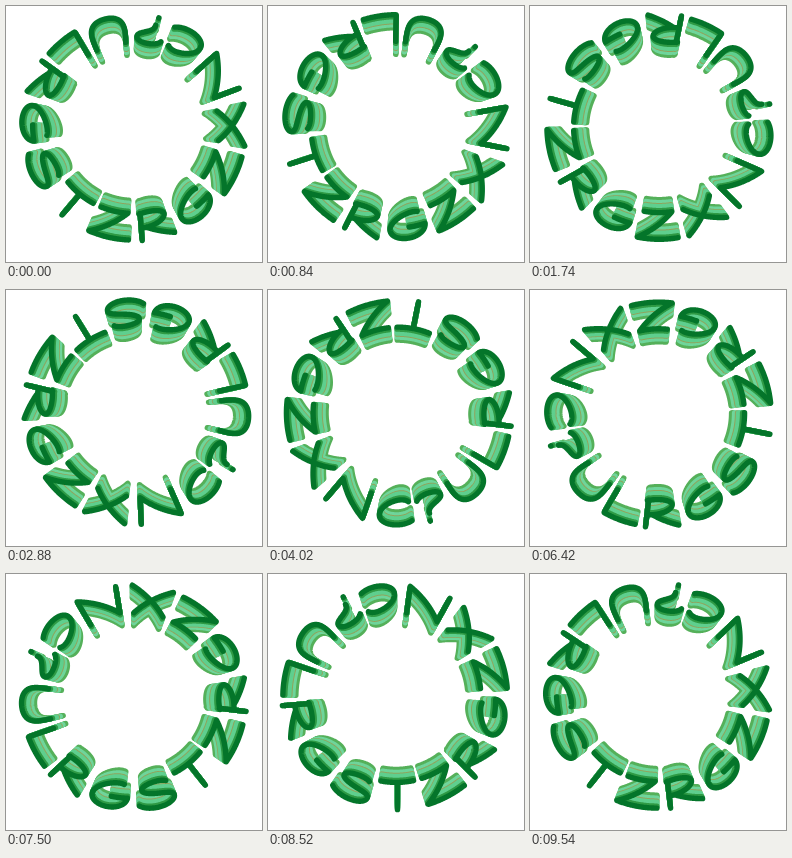
An HTML page with a canvas for the animation above (9.6 s loop, 256x256 px).

```html
<!DOCTYPE html>
<html lang="en">
<head>
<meta charset="utf-8">
<title>Rotating letter ring</title>
<style>
html, body { margin: 0; height: 100%; overflow: hidden; background: #fff; }
canvas { display: block; }
</style>
</head>
<body>
<canvas id="stage" width="256" height="256"></canvas>
<script>
const LOOP = 9600, STEP = 60, RADIUS = 114, DEPTH = 13, EM = 41;
const START = 142.5 * Math.PI / 180;
const ctx = document.getElementById('stage').getContext('2d');

// Advance width and pen strokes in hundredths of an em, y upwards from the baseline.
const glyphs = {
  T: [68, 'M6 70L63 69', 'M35 69L34 3'],
  Z: [69, 'M10 69H58L7 4H61'],
  R: [63, 'M10 2V68', 'M8 66C26 76 52 68 49 54C46 42 28 34 11 32', 'M18 33L54 4'],
  G: [68, 'M53 66C36 74 8 52 8 28C8 -4 56 -2 60 33L36 32'],
  X: [72, 'M7 3L60 70', 'M9 68L62 3'],
  N: [80, 'M12 3V68L67 6V71'],
  C: [60, 'M52 60C40 76 8 56 8 28C8 0 40 0 54 13'],
  '?': [52, 'M6 58C14 76 48 72 46 54C45 42 20 44 20 22', 'M18 4V3'],
  U: [74, 'M13 69C12 40 10 4 38 4C66 4 64 40 65 69'],
  L: [55, 'M8 69L7 4H51'],
  S: [69, 'M56 62C45 74 14 66 14 52C14 36 62 42 60 22C58 2 22 0 9 14']
};

const word = [...'TZRGZXNC?ULRGS'];
const total = word.reduce((sum, char) => sum + glyphs[char][0], 0);

function samplePoints(d) {
  const path = document.createElementNS('http://www.w3.org/2000/svg', 'path');
  path.setAttribute('d', d);
  const length = path.getTotalLength();
  const count = Math.ceil(length);
  return Array.from({ length: count + 1 }, (_, i) => path.getPointAtLength(length * i / count));
}

// Strokes of the whole word, each a list of points along the unbent line of text.
const strokes = [];
let pen = 0;
for (const char of word) {
  const [advance, ...paths] = glyphs[char];
  for (const d of paths) strokes.push(samplePoints(d).map(({ x, y }) => [pen + x, y]));
  pen += advance;
}

// Bends the text round the circle, tops towards the centre.
function ringPath(depth) {
  const path = new Path2D();
  for (const points of strokes) {
    points.forEach(([x, y], i) => {
      const angle = START - x / total * 2 * Math.PI;
      const radius = RADIUS - y / 100 * EM - depth;
      path[i ? 'lineTo' : 'moveTo'](radius * Math.cos(angle), radius * Math.sin(angle));
    });
  }
  return path;
}

function shade(depth) {
  if (depth > 10) return '#55b05a';
  if (depth > 7) return '#6fd59b';
  if (depth > 6) return '#8fa45c';
  if (depth > 2) return '#5fcf8e';
  return depth ? '#2f9a45' : '#04752a';
}

const layers = [];
for (let depth = DEPTH; depth >= 0; depth--) {
  layers.push({ path: ringPath(depth), color: shade(depth) });
}

function draw() {
  const time = Math.floor(performance.now() / STEP) * STEP % LOOP;
  ctx.clearRect(0, 0, 256, 256);
  ctx.save();
  ctx.translate(129, 122.7);
  ctx.rotate(time / LOOP * 2 * Math.PI);
  ctx.translate(-1.5, -1);
  ctx.lineWidth = 5.4;
  ctx.lineCap = ctx.lineJoin = 'round';
  for (const { path, color } of layers) {
    ctx.strokeStyle = color;
    ctx.stroke(path);
  }
  ctx.restore();
  requestAnimationFrame(draw);
}
draw();
</script>
</body>
</html>
```
